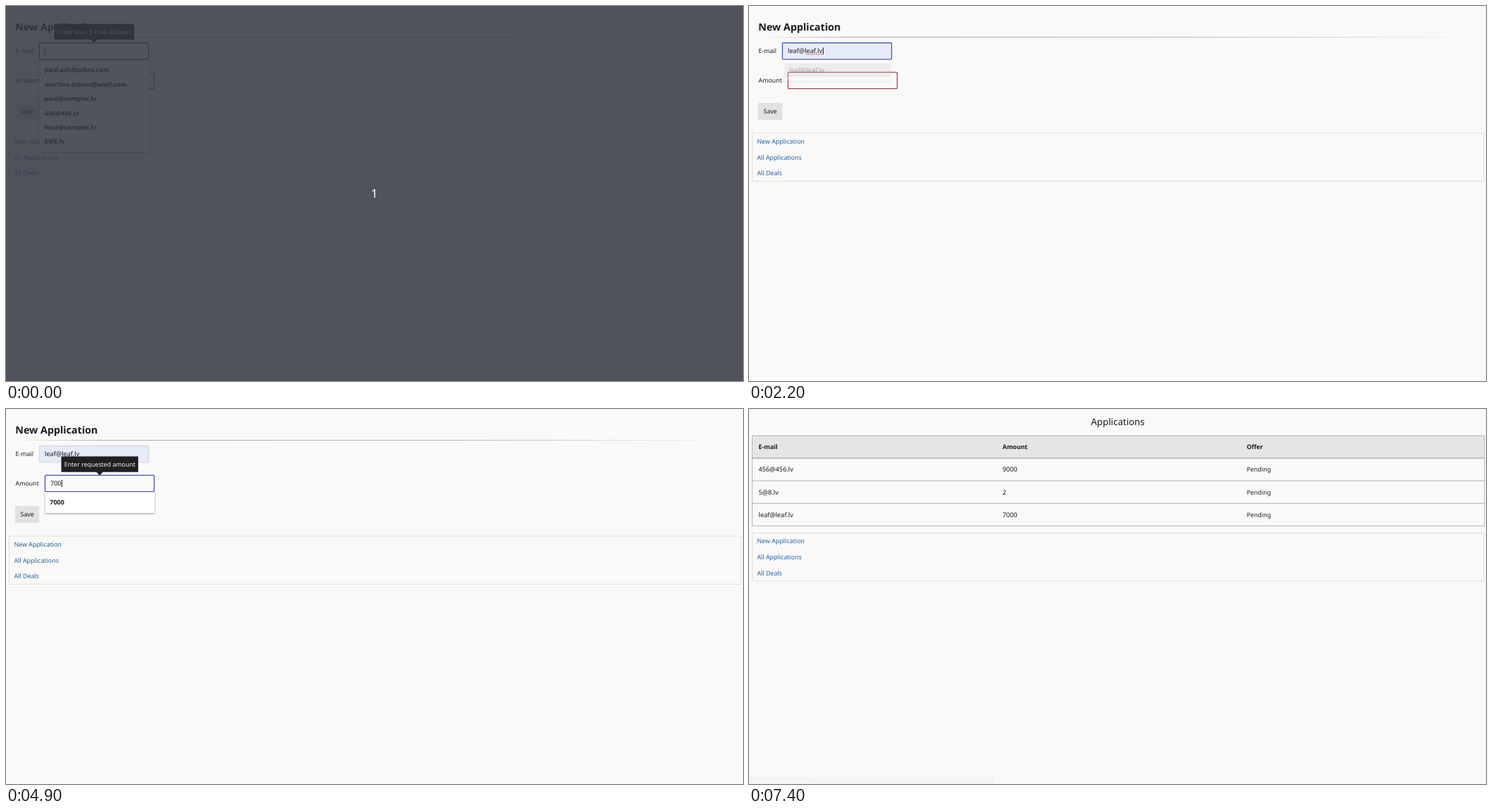
An HTML page that plays this animation: 1048x534 px, repeating every 8 s.

```html
<!DOCTYPE html>
<html lang="en">
<head>
<meta charset="utf-8">
<title>New Application</title>
<style>
html, body { margin: 0; width: 100%; height: 100%; overflow: hidden; background: #f9f9f7; }
svg { display: block; width: 100vw; height: 100vh; }
text { font: 8.8px "Noto Sans", "Open Sans", sans-serif; fill: #1b1b1b; text-rendering: geometricPrecision; white-space: pre; }
.value { font-size: 9.15px; }
.email { font-size: 9.2px; }
.bold, .menu text { font-weight: 600; }
.menu text { font-size: 9px; }
.menu .panel { fill: #fff; filter: drop-shadow(0 1px 1.2px rgba(0, 0, 0, .4)); }
.menu { transform-box: fill-box; transform-origin: center; }
.tip { fill: #20201f; }
.tip text { fill: #f4f4f2; }
.link { fill: #2460a3; font-size: 8.9px; }
.field { stroke-width: 1.3; }
.mark { fill: #cecece; }
.caret { fill: #222; }

/* Every state holds until the next one: 1.25% = 100 ms */
[style*="--k"] { animation: var(--k) 8s step-end infinite; }

@keyframes countdown { 0% { opacity: 1 } 2.5% { opacity: 0 } }
@keyframes form { 0% { opacity: 1 } 87.5% { opacity: 0 } }
@keyframes table { 0% { opacity: 0 } 87.5% { opacity: 1 } }
@keyframes nav { 0% { transform: none } 87.5% { transform: translateY(-4.5px) } }
@keyframes status { 0% { opacity: 0 } 86.25% { opacity: 1 } 91.25% { opacity: .5 } 92.5% { opacity: .025 } }
@keyframes save { 0% { stroke: #e1e1e0; fill: #e1e1e0 } 86.25% { stroke: #9691cb; fill: #dadada } }

@keyframes emailField {
  0% { stroke: #7d4398; fill: #f9f9f7 }
  3.75% { stroke: #4a58b0 }
  25% { fill: #e6ebf9 }
  38.75% { stroke: #d7dae2; fill: #e6ebf9 }
}
@keyframes emailCaret {
  0% { opacity: 1; transform: none }
  3.75% { transform: translateX(2.5px) }
  7.5% { transform: translateX(7.6px) }
  11.25% { transform: translateX(12.7px) }
  17.5% { opacity: 0 }
  25% { opacity: 1; transform: translateX(50px) }
  33.75% { opacity: 0 }
}
@keyframes emailTip { 0% { opacity: 1 } 17.5% { opacity: .5 } 18.75% { opacity: 0 } }
@keyframes emailList { 0% { opacity: 1 } 3.75% { opacity: 0 } }
@keyframes emailMatch {
  0% { opacity: 0; transform: none }
  3.75% { opacity: 1 }
  26.25% { opacity: .65; transform: scale(.985) }
  27.5% { opacity: .28; transform: scale(.965) }
  31.25% { opacity: 0 }
}
@keyframes spelling { 0% { opacity: 0 } 27.5% { opacity: 1 } 38.75% { opacity: 0 } }

@keyframes amountField {
  0% { stroke: #a8465c }
  38.75% { stroke: #7d4398 }
  55% { stroke: #4a52ac }
  86.25% { stroke: #d9d9d8 }
}
@keyframes amountCaret {
  0% { opacity: 0; transform: none }
  38.75% { opacity: 1 }
  48.75% { opacity: 0 }
  55% { opacity: 1; transform: translateX(5.2px) }
  58.75% { transform: translateX(10.4px) }
  61.25% { transform: translateX(15.5px) }
  62.5% { transform: translateX(20.7px) }
  70% { opacity: 0 }
  76.25% { opacity: 1 }
  86.25% { opacity: 0 }
}
@keyframes amountTip {
  0% { opacity: 0 }
  38.75% { opacity: .5 }
  40% { opacity: 1 }
  76.25% { opacity: .5 }
  77.5% { opacity: 0 }
}
@keyframes amountList { 0% { opacity: 0 } 40% { opacity: 1 } 55% { opacity: 0 } }
@keyframes amountMatch {
  0% { opacity: 0; transform: none }
  55% { opacity: 1 }
  63.75% { opacity: .3; transform: scale(.965) }
  65% { opacity: 0 }
}

@keyframes email1 { 0% { fill-opacity: 0 } 3.75% { fill-opacity: 1 } }
@keyframes email2 { 0% { fill-opacity: 0 } 7.5% { fill-opacity: 1 } }
@keyframes email3 { 0% { fill-opacity: 0 } 11.25% { fill-opacity: 1 } }
@keyframes emailRest { 0% { fill-opacity: 0 } 25% { fill-opacity: 1 } }
@keyframes digit1 { 0% { fill-opacity: 0 } 55% { fill-opacity: 1 } }
@keyframes digit2 { 0% { fill-opacity: 0 } 58.75% { fill-opacity: 1 } }
@keyframes digit3 { 0% { fill-opacity: 0 } 61.25% { fill-opacity: 1 } }
@keyframes digit4 { 0% { fill-opacity: 0 } 62.5% { fill-opacity: 1 } }
@keyframes emailMark { 0% { opacity: 0 } 25% { opacity: 1 } }
@keyframes amountMark { 0% { opacity: 0 } 62.5% { opacity: 1 } }
</style>
</head>
<body>
<svg viewBox="0 0 1048 534" preserveAspectRatio="none">
  <defs>
    <linearGradient id="rule">
      <stop offset="0" stop-color="#aaacad" stop-opacity="0"/>
      <stop offset=".12" stop-color="#aaacad"/>
      <stop offset=".6" stop-color="#b2b4b4"/>
      <stop offset="1" stop-color="#b2b4b4" stop-opacity="0"/>
    </linearGradient>
  </defs>
  <rect width="1048" height="534" fill="#f9f9f7"/>

  <g style="--k:nav">
    <rect x="4.5" y="181" width="1040.5" height="68.5" fill="none" stroke="#dfdfde"/>
    <text class="link" x="11.4" y="195.8">New Application</text>
    <text class="link" x="11.4" y="218.5">All Applications</text>
    <text class="link" x="11.4" y="241.2">All Deals</text>
  </g>

  <g style="--k:form">
    <text class="bold" x="13.3" y="34.6" style="font-size:14.3px">New Application</text>
    <rect x="14" y="44" width="1020" height="1" fill="url(#rule)"/>
    <text x="13.6" y="67.2">E-mail</text>
    <text x="13.6" y="109.2">Amount</text>

    <rect class="field" x="47.5" y="52.5" width="155.3" height="23.3" rx="1" style="--k:emailField"/>
    <text class="email" x="55" y="67.2"><tspan style="--k:email1">l</tspan><tspan style="--k:email2">e</tspan><tspan style="--k:email3">a</tspan><tspan style="--k:emailRest">f@leaf.lv</tspan></text>
    <path d="M80 68.8H105" stroke="#d8433c" stroke-dasharray="1.4 .8" style="--k:spelling"/>
    <rect class="caret" x="55" y="59" width="1" height="10" style="--k:emailCaret"/>

    <rect class="field" x="55.5" y="94.4" width="155.2" height="23.3" rx="1" fill="#f9f9f7" style="--k:amountField"/>
    <text class="value" x="62.9" y="109.2"><tspan style="--k:digit1">7</tspan><tspan style="--k:digit2">0</tspan><tspan style="--k:digit3">0</tspan><tspan style="--k:digit4">0</tspan></text>
    <rect class="caret" x="63" y="101" width="1" height="10" style="--k:amountCaret"/>

    <rect x="13.5" y="138.5" width="33.3" height="23.3" style="--k:save"/>
    <text x="20.6" y="153.3">Save</text>

    <g class="menu" style="--k:emailList">
      <rect class="panel" x="47.7" y="77" width="155.8" height="131"/>
      <text x="54.5" y="94.4">paul.ash@zebro.com</text>
      <text x="54.5" y="114.8">martins.oldens@vrell.com</text>
      <text x="54.5" y="135.2">paul@sampler.lv</text>
      <text x="54.5" y="155.6">456@456.lv</text>
      <text x="54.5" y="176">lena@sampler.lv</text>
      <text x="54.5" y="196.4">5@8.lv</text>
    </g>
    <g class="menu" style="--k:emailMatch">
      <rect class="panel" x="47.7" y="77" width="155.8" height="30"/>
      <rect class="mark" x="47.7" y="81.3" width="155.8" height="20.4" style="--k:emailMark"/>
      <text x="54.5" y="94.4">leaf@leaf.lv</text>
    </g>
    <g class="menu" style="--k:amountList">
      <rect class="panel" x="55.6" y="118.4" width="155.8" height="111"/>
      <text x="62.3" y="136.3">4000</text>
      <text x="62.3" y="156.7">9000</text>
      <text x="62.3" y="177.1">2</text>
      <text x="62.3" y="197.5">6000</text>
      <text x="62.3" y="217.9">7000</text>
    </g>
    <g class="menu" style="--k:amountMatch">
      <rect class="panel" x="55.6" y="118.4" width="155.8" height="29.8"/>
      <rect class="mark" x="55.6" y="123" width="155.8" height="20.4" style="--k:amountMark"/>
      <text x="62.3" y="136.3">7000</text>
    </g>

    <g class="tip" style="--k:emailTip">
      <path d="M68.6 25.5H182V47.8H130L125.2 52.6L120.4 47.8H68.6Z"/>
      <text x="72.8" y="40.1">Enter your E-mail address</text>
    </g>
    <g class="tip" style="--k:amountTip">
      <path d="M78.6 67.5H188V89.8H138L133.2 94.6L128.4 89.8H78.6Z"/>
      <text x="82.8" y="82.1">Enter requested amount</text>
    </g>
  </g>

  <g style="--k:table">
    <text x="524.5" y="22.6" text-anchor="middle" style="font-size:13.3px">Applications</text>
    <rect x="4.5" y="38" width="1041.5" height="32" fill="#e5e5e4"/>
    <path d="M4.5 38H1046V166.5H4.5ZM4.5 102.2H1046M4.5 134.4H1046" fill="none" stroke="#b4b4b3"/>
    <path d="M4.5 70H1046" stroke="#939392"/>
    <g class="bold">
      <text class="bold" x="13.6" y="57.2">E-mail</text>
      <text class="bold" x="360.6" y="57.2">Amount</text>
      <text class="bold" x="707.8" y="57.2">Offer</text>
    </g>
    <text class="email" x="13.6" y="89.4">456@456.lv</text>
    <text class="value" x="360.6" y="89.4">9000</text>
    <text x="707.8" y="89.4">Pending</text>
    <text class="email" x="13.6" y="121.6">5@8.lv</text>
    <text class="value" x="360.6" y="121.6">2</text>
    <text x="707.8" y="121.6">Pending</text>
    <text class="email" x="13.6" y="153.8">leaf@leaf.lv</text>
    <text class="value" x="360.6" y="153.8">7000</text>
    <text x="707.8" y="153.8">Pending</text>
  </g>

  <g style="--k:status">
    <path d="M0 524H346Q348 524 348 526V534H0Z" fill="#2a2b2b"/>
    <text x="2" y="533.2" style="font-size:8.55px;fill:#b0b0ae">Waiting for localhost…</text>
  </g>

  <g style="--k:countdown">
    <rect width="1048" height="534" fill="#343741" fill-opacity=".85"/>
    <text x="523.8" y="273" text-anchor="middle" style="font-size:17px;fill:#fff">1</text>
  </g>
</svg>
</body>
</html>
```
